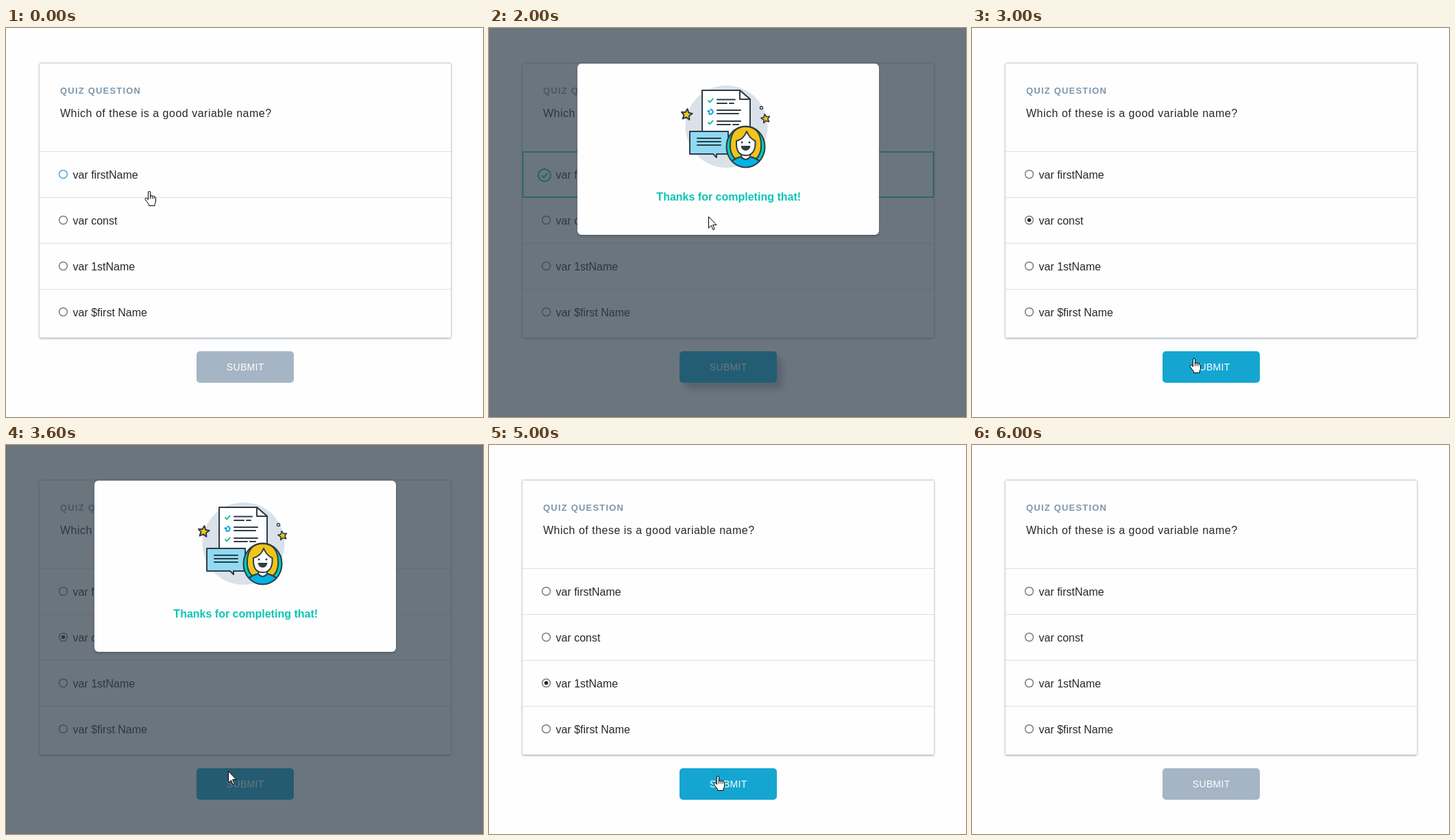
Recreate the animation shown at these times as an HTML page. Size 696 by 568 pixels, loop 6.6 s.

```html
<!DOCTYPE html>
<html lang="en">
<head>
<meta charset="utf-8">
<title>Quiz question</title>
<style>
  html, body { margin: 0; width: 100%; height: 100%; overflow: hidden; background: #fefefe; }
  svg { display: block; width: 696px; height: 568px; }
  text { font-family: "Liberation Sans", Arial, sans-serif; font-size: 16px; fill: #24292f; }
  .ink { fill: none; stroke: #2e3d49; stroke-width: 2; stroke-linecap: round; stroke-linejoin: round; }
  .shape { stroke: #2e3d49; stroke-width: 2; stroke-linejoin: round; }
  .tick { fill: none; stroke: #1fbf9c; stroke-width: 2; }
  .cursor { fill: #fff; stroke: #000; stroke-width: 1; stroke-linejoin: round; }
</style>
</head>
<body>
<svg viewBox="0 0 696 568">
  <defs>
    <filter id="soft" x="-20%" y="-20%" width="140%" height="140%"><feGaussianBlur stdDeviation="1.6"/></filter>
    <filter id="wide" x="-30%" y="-60%" width="160%" height="220%"><feGaussianBlur stdDeviation="6"/></filter>
    <clipPath id="portrait"><ellipse cx="374.5" cy="173.5" rx="28" ry="30"/></clipPath>
    <path id="star" d="M0 -8L2.4 -2.7 8 -2.2 3.8 1.7 5 7.3 0 4.4 -5 7.3 -3.8 1.7 -8 -2.2 -2.4 -2.7Z"/>
  </defs>

  <rect width="696" height="568" fill="#fefefe"/>
  <rect x="48.5" y="51.5" width="601" height="402" rx="2" fill="#8f9bab" opacity=".8" filter="url(#soft)"/>
  <rect x="49" y="52" width="600" height="400" fill="#fefefe"/>
  <text x="79" y="96" style="font-size:13px;font-weight:bold;letter-spacing:1.2px;fill:#7d97ad">QUIZ QUESTION</text>
  <text x="79" y="130" style="letter-spacing:.5px">Which of these is a good variable name?</text>
  <g id="rows"></g>
  <g id="result">
    <rect x="49.5" y="181" width="599" height="66" fill="none" stroke="#02c3a0" stroke-width="1.5"/>
    <circle cx="81" cy="215" r="9" fill="#fefefe" stroke="#02c3a0" stroke-width="2"/>
    <path d="M76.8 215.2l3 3 5.6-6" fill="none" stroke="#02c3a0" stroke-width="2"/>
  </g>

  <rect id="glow" x="286" y="481" width="142" height="46" rx="5" fill="#2e3d49" opacity=".35" filter="url(#wide)"/>
  <rect id="button" x="278" y="472" width="142" height="46" rx="5"/>
  <text x="349.2" y="500" text-anchor="middle" style="font-size:14px;letter-spacing:.3px;fill:#fff">SUBMIT</text>

  <g id="modal">
    <rect width="696" height="568" fill="#2e3d49" opacity=".7"/>
    <rect x="129" y="54" width="440" height="250" rx="6" fill="#2e3d49" opacity=".4" filter="url(#soft)"/>
    <rect x="129" y="52" width="440" height="250" rx="6" fill="#fefefe"/>
    <circle cx="346.5" cy="144" r="60" fill="#dae1e8"/>

    <path class="shape" fill="#fff" d="M311 91H366L381 104V170H311Z"/>
    <path class="shape" fill="#fff" d="M366 91V104H381Z"/>
    <path class="ink" d="M333 104.5H359M333 110H347M351 110H357M333 120H367M333 125H364M333 136H367M333 141H352M356 141H364"/>
    <path class="tick" d="M319.5 105.5l2.7 2.8 5-5.5M319.5 137.5l2.7 2.8 5-5.5"/>
    <path d="M320.5 124.5A3.4 3.4 0 1 0 322.5 119" fill="none" stroke="#02a8dc" stroke-width="2"/>
    <path d="M317.5 121l5-1.2-.6 5Z" fill="#02a8dc"/>

    <path class="shape" fill="#91d9f2" d="M293 151H349V184H332V189L327 184H293Z"/>
    <path class="ink" d="M304 161H338M304 166H338M304 171H338"/>

    <g clip-path="url(#portrait)">
      <rect x="345" y="142" width="60" height="63" fill="#02ccba"/>
      <path class="shape" fill="#f0c419" d="M374.5 144C360 144 353 154 352 168C351 182 356 190 364 194H385C393 190 398 182 397 168C396 154 389 144 374.5 144Z"/>
      <path class="shape" fill="#02b3e4" d="M347 206C350 194 359 190 368 188H381C390 190 399 194 402 206Z"/>
      <path class="shape" fill="#fff" d="M368 182V188Q374.5 196 381 188V182Z"/>
      <path class="shape" fill="#fff" d="M361 165Q372 162 376 151Q380 161 388.500 165V171Q387 186 374.500 186Q362 186 361 171Z"/>
      <circle cx="369" cy="167" r="1.5" fill="#2e3d49"/>
      <circle cx="380" cy="167" r="1.5" fill="#2e3d49"/>
      <path d="M367.500 172H381.500Q380.500 179 374.500 179T367.500 172Z" fill="#2e3d49"/>
    </g>
    <ellipse class="ink" cx="374.5" cy="173.500" rx="28" ry="30"/>

    <use href="#star" class="shape" fill="#f0c419" transform="translate(288.500 126) rotate(8)"/>
    <use href="#star" class="shape" fill="#f0c419" transform="translate(403.500 132) rotate(-12) scale(.8)"/>
    <circle cx="397.500" cy="116.500" r="2" fill="#fff" stroke="#2e3d49" stroke-width="1.500"/>
    <text x="349.700" y="252" text-anchor="middle" style="font-weight:bold;fill:#0cc4b5">Thanks for completing that!</text>
  </g>

  <g id="hand" class="cursor">
    <path d="M-.5 12.5V2Q-.5 .5 1 .5T2.500 2V8Q2.500 6.700 4 6.700T5.300 8Q5.500 7 6.700 7T8 8.500Q8.300 8 9.200 8.200T10.500 10V15Q10.500 17 9 19V21.500H.5V19.500L-4.500 13Q-5.700 11 -4.500 10.300T-2 11Z"/>
    <path fill="none" d="M2.500 8V11.500M5.300 8V11.500M8 8.500V11.500"/>
  </g>
  <path id="arrow" class="cursor" d="M.5 .5V17L4.300 13.400 7 19.600 9.200 18.700 6.600 12.600H12Z"/>
</svg>

<script>
const LOOP = 6600, STEP = 200;
const $ = id => document.getElementById(id);
const show = (el, on) => el.setAttribute('visibility', on ? 'visible' : 'hidden');
const within = (t, from, to) => t >= from && t < to;

// time, x, y of the pointer tip
const track = [
  [0, 208, 238], [400, 188, 222], [600, 230, 300], [800, 315, 440],
  [1000, 351, 502], [1400, 351, 502], [1600, 348, 490], [1800, 332, 360],
  [2000, 320, 275], [2600, 320, 285], [2800, 322, 400], [3000, 323, 482],
  [3400, 323, 482], [3600, 324, 476], [3800, 321, 452], [4000, 321, 452],
  [4200, 314, 423], [4400, 314, 370], [4600, 314, 350], [4800, 328, 440],
  [5000, 333, 483], [6600, 333, 483]
];

// chosen row, moment of choice, modal opening, reset
const rounds = [
  { row: 0, pick: 400, open: 1400, reset: 2200 },
  { row: 1, pick: 2400, open: 3200, reset: 4200 },
  { row: 2, pick: 4600, open: 5200, reset: 6000 }
];

const labels = ['var firstName', 'var const', 'var 1stName', 'var $first Name'];
$('rows').innerHTML = labels.map((label, i) => `
  <g transform="translate(0 ${i * 67})">
    <path d="M49 180.5H649" stroke="#dcdfe3"/>
    <rect class="focus" x="77" y="207" width="13" height="13" rx="1" fill="#e4f0fb" stroke="#79b4e8" stroke-width="1.6"/>
    <circle class="ring" cx="83.5" cy="213.5" r="5.9" fill="#fff" stroke-width="1.3"/>
    <circle class="dot" cx="83.5" cy="213.5" r="2.8" fill="#24292f"/>
    <text x="97.5" y="220">${label}</text>
  </g>`).join('');
const rows = [...$('rows').children].map(g => ({
  focus: g.querySelector('.focus'),
  ring: g.querySelector('.ring'),
  dot: g.querySelector('.dot')
}));

function pointer(t) {
  const i = track.findIndex(p => p[0] > t);
  const [t0, x0, y0] = track[i - 1], [t1, x1, y1] = track[i];
  const k = (t - t0) / (t1 - t0);
  return [Math.round(x0 + (x1 - x0) * k), Math.round(y0 + (y1 - y0) * k)];
}

function buttonColor(round, t, over) {
  if (!round) return '#a5b5c5';
  if (t >= round.open) return round.row === 0 && t >= 1600 ? '#08addc' : '#0da5cf';
  if (!over) return '#02b3e4';
  return round.row === 0 ? '#0a9ac5' : '#14a6d1';
}

function draw(t) {
  const [x, y] = pointer(t);
  const round = rounds.find(r => within(t, r.pick, r.reset));
  const picked = round ? round.row : -1;
  const open = !!round && t >= round.open;
  const solved = open && picked === 0 && t >= 1600;
  const onRow = !open && within(y, 181, 452) ? Math.floor((y - 180.5) / 67) : -1;
  const present = t < 6000;

  rows.forEach((row, i) => {
    const hover = present && i === onRow && i !== picked;
    row.ring.setAttribute('stroke', hover ? '#349bc8' : '#686b70');
    show(row.ring, !(solved && i === 0));
    show(row.dot, i === picked && !solved);
    show(row.focus, i === 0 && within(t, 400, 1400));
  });

  $('button').setAttribute('fill', buttonColor(round, t, y >= 472));
  show($('glow'), solved);
  show($('result'), solved);
  show($('modal'), open);
  show($('hand'), present && !open);
  show($('arrow'), present && open);
  for (const id of ['hand', 'arrow']) $(id).setAttribute('transform', `translate(${x} ${y})`);
}

const start = performance.now();
function tick() {
  const t = (performance.now() - start) % LOOP;
  draw(Math.floor(t / STEP) * STEP);
  requestAnimationFrame(tick);
}
tick();
</script>
</body>
</html>
```
